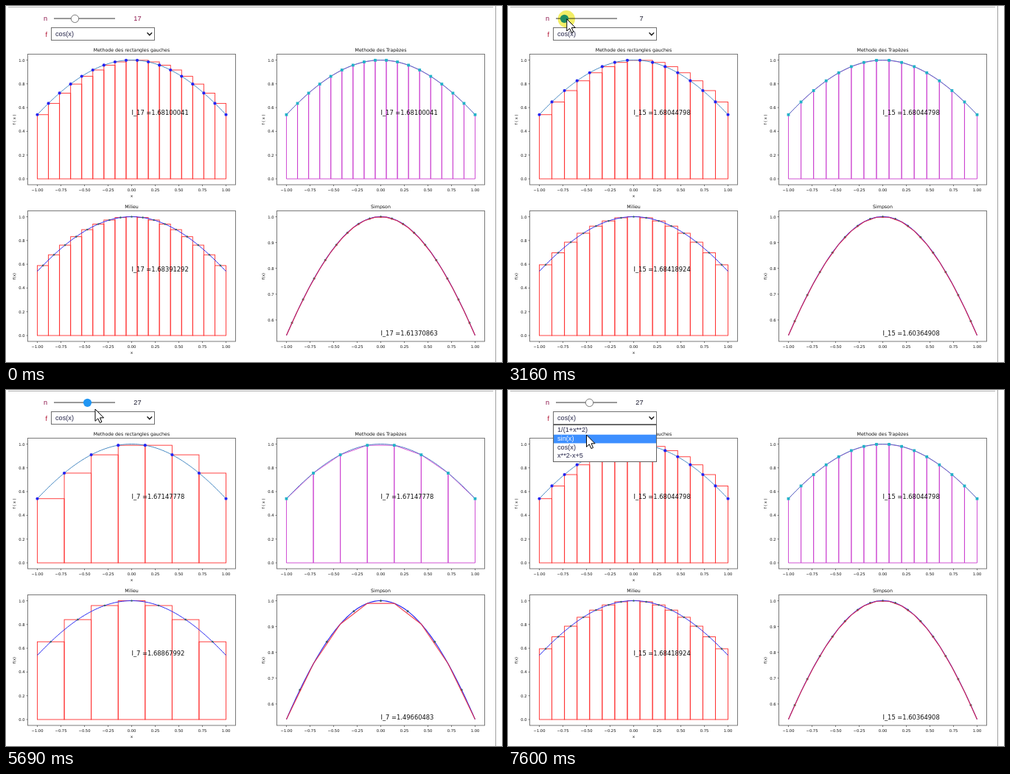
An HTML page with a canvas for the animation above (8 s loop, 673 px wide and 484 px high).

```html
<!DOCTYPE html>
<html lang="fr">
<head>
<meta charset="utf-8">
<title>Intégration numérique</title>
<style>
html, body { margin: 0; width: 100%; height: 100%; overflow: hidden; background: #fff; }
canvas { display: block; width: 673px; height: 484px; }
</style>
</head>
<body>
<canvas id="stage"></canvas>
<script>
const W = 673, H = 484, LOOP = 8000;
const canvas = document.getElementById('stage');
const ctx = canvas.getContext('2d');
const ratio = window.devicePixelRatio || 1;
canvas.width = W * ratio;
canvas.height = H * ratio;

const PLOT_FONT = '"DejaVu Sans", sans-serif';
const UI_FONT = '"Liberation Sans", Arial, sans-serif';
const f = Math.cos;

// Stepped values: [time, value]
const SLIDER = [[0, 17], [2470, 15], [2545, 13], [2620, 11], [2700, 9], [2780, 7],
  [3240, 9], [3320, 11], [3470, 13], [3720, 15], [3870, 17], [4100, 19], [4250, 21],
  [4410, 23], [4640, 25], [4950, 27]];
const PLOTTED = [[0, 17], [3160, 15], [3720, 13], [4290, 11], [4870, 9], [5340, 7],
  [5920, 9], [6460, 11], [7030, 13], [7600, 15]];

// Pointer moves: first step, last step, number of steps, end point
const START = [556, 492];
const MOVES = [
  [70, 360, 5, 320, 391], [670, 930, 4, 153, 183], [1220, 1670, 7, 95, 20.5],
  [2470, 2780, 5, 77, 18], [3160, 3470, 5, 91, 16.5], [3720, 3720, 1, 94, 16.5],
  [3870, 4490, 9, 106, 15.5], [4570, 4720, 3, 109.5, 15], [4870, 5110, 4, 113, 14],
  [5590, 5690, 2, 121, 26], [5920, 6310, 6, 107, 36], [6710, 6780, 2, 106.5, 65],
  [6950, 6950, 1, 106.5, 64], [7350, 7350, 1, 106.5, 63], [7530, 7530, 1, 106.5, 61]
];

function valueAt(list, t) {
  let v = list[0][1];
  for (const [time, value] of list) if (t >= time) v = value;
  return v;
}

function pointerAt(t) {
  if (t < MOVES[0][0]) return null;
  let [x, y] = START;
  for (const [t0, t1, steps, tx, ty] of MOVES) {
    if (t < t0) break;
    const done = t >= t1 ? steps : Math.floor((t - t0) / (t1 - t0) * (steps - 1) + 1e-6) + 1;
    x += (tx - x) * done / steps;
    y += (ty - y) * done / steps;
  }
  return [x, y];
}

function text(str, x, y, size, { font = PLOT_FONT, color = '#111', align = 'left', base = 'alphabetic' } = {}) {
  ctx.font = `${size}px ${font}`;
  ctx.fillStyle = color;
  ctx.textAlign = align;
  ctx.textBaseline = base;
  ctx.fillText(str, x, y);
}

function line(points, color, width) {
  ctx.beginPath();
  points.forEach(([x, y]) => ctx.lineTo(x, y));
  ctx.strokeStyle = color;
  ctx.lineWidth = width;
  ctx.stroke();
}

function dot(x, y, r, color) {
  ctx.beginPath();
  ctx.arc(x, y, r, 0, 2 * Math.PI);
  ctx.fillStyle = color;
  ctx.fill();
}

function box(x, y, w, h, fill, stroke) {
  ctx.fillStyle = fill;
  ctx.fillRect(x, y, w, h);
  if (!stroke) return;
  ctx.strokeStyle = stroke;
  ctx.lineWidth = 1;
  ctx.strokeRect(x, y, w, h);
}

const range = (count, fn) => Array.from({ length: count }, (_, i) => fn(i));
const nodes = n => range(n + 1, i => -1 + 2 * i / n);
const middles = n => range(n, i => -1 + (2 * i + 1) / n);

// Equals the left sum here, since f(-1) = f(1)
const leftSum = n => 2 / n * nodes(n).slice(0, n).reduce((s, x) => s + f(x), 0);
const middleSum = n => 2 / n * middles(n).reduce((s, x) => s + f(x), 0);
// Composite rule over the first n nodes only
const simpsonSum = n => 2 / n / 3 * nodes(n).slice(0, n).reduce((s, x, i) =>
  s + f(x) * (i === 0 || i === n - 1 ? 1 : i % 2 ? 4 : 2), 0);

function makeAxes(left, top, { low = 0, unit = 161.5, title, yLabel, xLabel }) {
  const cx = left + 141, y1 = top + 8;
  const px = x => cx + 128 * x;
  const py = y => y1 + unit * (1 - y);
  const at = x => [px(x), py(f(x))];
  const step = low ? 0.1 : 0.2;

  function frame() {
    const right = left + 282, bottom = top + 177.5;
    ctx.strokeStyle = '#6c6c6c';
    ctx.lineWidth = 0.9;
    ctx.strokeRect(left, top, 282, 177.5);
    for (let i = -4; i <= 4; i++) {
      const x = px(i / 4);
      line([[x, bottom], [x, bottom + 2]], '#444', 0.7);
      text((i / 4).toFixed(2).replace('-', '\u2212'), x, bottom + 8.6, 5.2, { align: 'center' });
    }
    for (let v = low; v < 1.01; v += step) {
      line([[left - 2, py(v)], [left, py(v)]], '#444', 0.7);
      text(v.toFixed(1), left - 4, py(v) + 2, 5.2, { align: 'right' });
    }
    text(title, cx, top - 3.2, 6.25, { align: 'center' });
    if (xLabel) text('x', cx, bottom + 16.8, 5.2, { align: 'center' });
    ctx.save();
    ctx.translate(left - 16.5, top + 89);
    ctx.rotate(-Math.PI / 2);
    text(yLabel, 0, 0, 5.2, { align: 'center' });
    ctx.restore();
  }

  return {
    px, py, at, frame,
    curve(color, width) { line(range(101, i => at(-1 + i / 50)), color, width); },
    bars(n, heights) {
      ctx.strokeStyle = '#ff2f2f';
      ctx.lineWidth = 0.9;
      heights.forEach((h, i) => {
        const x = px(-1 + 2 * i / n), y = py(h);
        ctx.strokeRect(x, y, 256 / n, py(0) - y);
      });
    },
    result(n, value) {
      text(`I_${n} =${value.toFixed(8)}`, px(0), py(f(1)) + 0.4, 8.33);
    }
  };
}

const axes = {
  left: makeAxes(29.5, 65.5, { title: 'Methode des rectangles gauches', yLabel: 'f ( x )', xLabel: true }),
  trapeze: makeAxes(367.5, 65.5, { title: 'Methode des Trapèzes', yLabel: 'f ( x )' }),
  middle: makeAxes(29.5, 278.5, { title: 'Milieu', yLabel: 'f(x)', xLabel: true }),
  simpson: makeAxes(367.5, 278.5, { low: 0.6, unit: 351, title: 'Simpson', yLabel: 'f(x)' })
};

function drawPlots(n) {
  const xs = nodes(n), mids = middles(n);
  Object.values(axes).forEach(a => a.frame());

  let a = axes.left;
  a.bars(n, xs.slice(0, n).map(f));
  a.curve('#3f84c0', 0.95);
  xs.forEach(x => dot(...a.at(x), 2.1, '#2424f0'));
  a.result(n, leftSum(n));

  a = axes.trapeze;
  for (let i = 0; i < n; i++) {
    const p = xs[i], q = xs[i + 1];
    line([[a.px(p), a.py(0)], a.at(p), a.at(q), [a.px(q), a.py(0)], [a.px(p), a.py(0)]], '#cb3fd0', 0.9);
  }
  a.curve('#4a78c4', 0.95);
  xs.forEach(x => {
    const [mx, my] = a.at(x);
    box(mx - 1.9, my - 1.9, 3.8, 3.8, '#22b2c8');
  });
  a.result(n, leftSum(n));

  a = axes.middle;
  a.bars(n, mids.map(f));
  a.curve('#2020f0', 0.95);
  mids.forEach(x => dot(...a.at(x), 1.3, '#3a6870'));
  a.result(n, middleSum(n));

  a = axes.simpson;
  a.curve('#2020f0', 1.1);
  mids.forEach(x => dot(...a.at(x), 1.5, '#3a5c68'));
  line(xs.map(a.at), 'rgba(240,40,60,0.88)', 1.15);
  a.result(n, simpsonSum(n));
}

function drawSlider(n, hot, touched) {
  const ink = { font: UI_FONT, color: '#8a1048' };
  text('n', 51, 20, 9.2, ink);
  text('f', 53.5, 41.5, 9.2, { ...ink, color: '#b01030' });
  line([[65, 17], [148, 17]], '#777', 1.3);
  const x = 93.5 + (n - 17) * 1.7;
  if (hot) {
    dot(x, 17.3, 5.6, '#2196f3');
  } else {
    dot(x, 17.3, 5.2, '#fff');
    ctx.strokeStyle = '#777';
    ctx.lineWidth = 1;
    ctx.stroke();
  }
  text(n, 183.5, 20, 9.2, { font: UI_FONT, align: 'right', color: touched ? '#15152a' : '#8a1048' });
}

function drawSelect(open, active) {
  const ink = { font: UI_FONT, color: '#26264a', base: 'middle' };
  box(61.5, 29.5, 140, 17, '#fff', '#707070');
  text('cos(x)', 67, 38.7, 9.2, ink);
  line([[191.5, 36.2], [194.8, 39.6], [198.1, 36.2]], '#222', 1.5);
  if (!open) return;
  box(61.5, 47.5, 140, 50, '#fff', '#606060');
  ['1/(1+x**2)', 'sin(x)', 'cos(x)', 'x**2-x+5'].forEach((label, i) => {
    const y = 54.3 + 11.7 * i;
    if (i === active) box(62, y - 5.3, 139, 11.7, '#3d8fff');
    text(label, 67, y + 0.4, 9.2, { ...ink, color: i === active ? '#fff' : ink.color });
  });
}

function drawHalo([x, y]) {
  ctx.save();
  ctx.globalCompositeOperation = 'multiply';
  dot(x - 0.5, y, 11.7, '#f2ee66');
  ctx.restore();
}

function drawPointer([x, y]) {
  const shape = [[0, 0], [0, 16.3], [3.8, 12.8], [6.4, 18.6], [9, 17.4], [6.5, 11.8], [11.6, 11.8]];
  ctx.beginPath();
  shape.forEach(([dx, dy]) => ctx.lineTo(x + dx, y + dy));
  ctx.closePath();
  ctx.fillStyle = '#fff';
  ctx.fill();
  ctx.strokeStyle = '#000';
  ctx.lineWidth = 1;
  ctx.stroke();
}

function draw(t) {
  ctx.setTransform(ratio, 0, 0, ratio, 0, 0);
  box(0, 0, W, H, '#fff');
  line([[3, 1.5], [661, 1.5]], '#b4b4b4', 1);
  line([[664.5, 0], [664.5, H]], '#a0a0a0', 1);

  const pointer = pointerAt(t);
  drawPlots(valueAt(PLOTTED, t));
  drawSlider(valueAt(SLIDER, t), t >= 1670 && t < 6000, t >= 2470);
  drawSelect(t >= 6390, t >= 6710 ? 1 : 2);
  if (t >= 2225 && t < 5300) drawHalo(pointer);
  if (pointer) drawPointer(pointer);
}

const begin = performance.now();
function tick() {
  draw((performance.now() - begin) % LOOP);
  requestAnimationFrame(tick);
}
tick();
</script>
</body>
</html>
```
